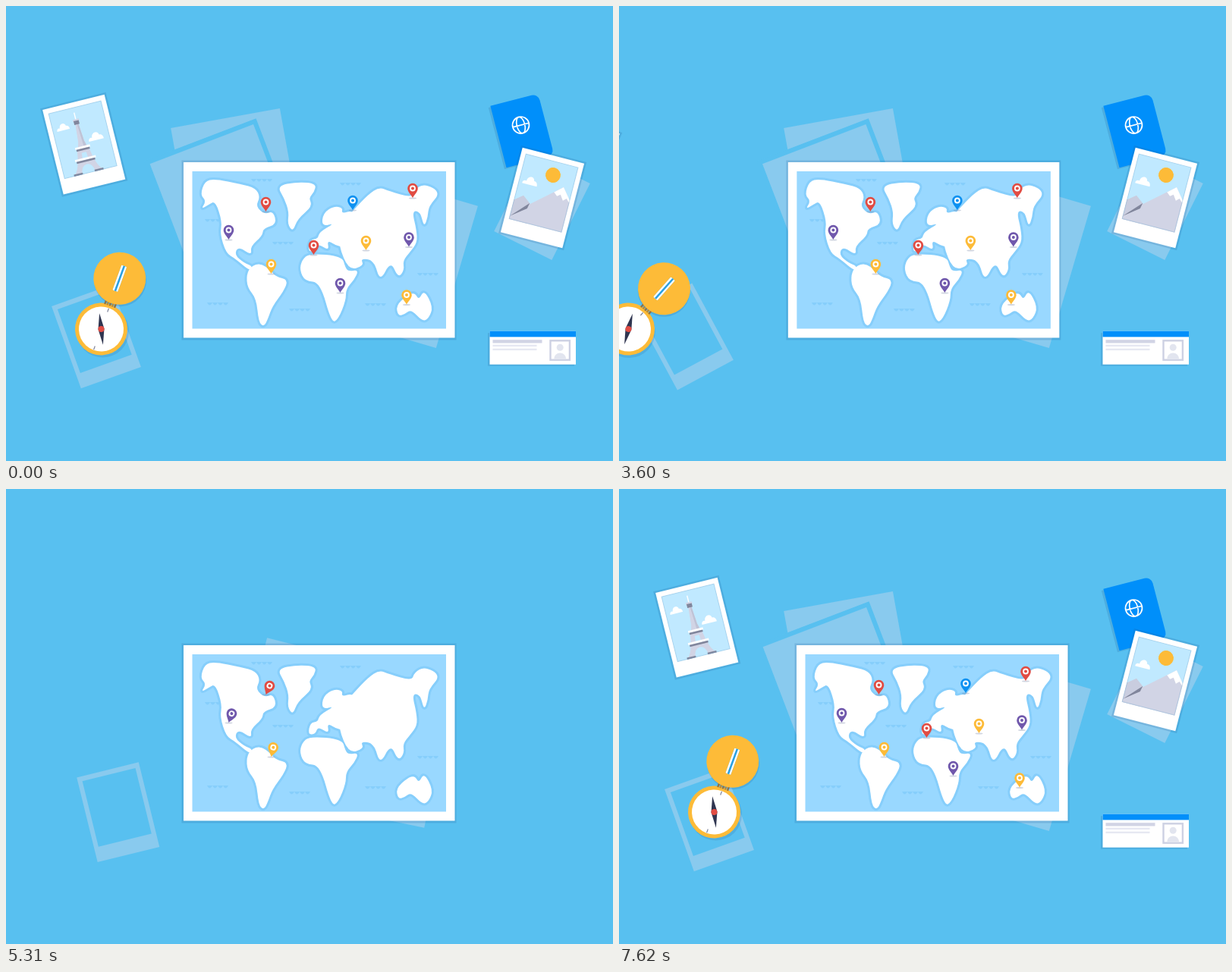
An HTML page with a canvas for the animation above (7.65 s loop, 800 by 600 pixels).

```html
<!DOCTYPE html>
<html lang="en">
<head>
<meta charset="utf-8">
<title>Travel desk</title>
<style>
  html, body { margin: 0; width: 100%; height: 100%; overflow: hidden; background: #58c0f0; }
  canvas { display: block; width: 800px; height: 600px; }
</style>
</head>
<body>
<canvas id="stage" width="800" height="600"></canvas>
<script>
const g = document.getElementById('stage').getContext('2d');
const LOOP = 7650, SWAP = 4580, PULL = 1.82e-6;
const BG = '#58c0f0', PALE = '#89caee', SKY = '#c0e9ff', BLUE = '#008ffa', GOLD = '#fdbb38';
const RED = '#e14c43', PURPLE = '#7058ac', STONE = '#d1d4e5', DARK = '#81869c', SHADE = 'rgba(35,95,155,.2)';

const clamp = v => Math.max(0, Math.min(1, v));
const span = (t, start, len) => clamp((t - start) / len);
const cubic = u => 1 - (1 - u) ** 3;
const back = u => 1 + 2.7 * (u - 1) ** 3 + 1.7 * (u - 1) ** 2;
const swing = u => u >= 1 ? 0 : 2 ** (-10 * u) * Math.cos(u * 2 * Math.PI / .3);

function at(x, y, deg, draw, sx = 1, sy = sx) {
  g.save();
  g.translate(x, y);
  g.rotate(deg * Math.PI / 180);
  g.scale(sx, sy);
  draw();
  g.restore();
}
function box(x, y, w, h, color) {
  g.fillStyle = color;
  g.fillRect(x, y, w, h);
}
function disc(x, y, r, color) {
  g.fillStyle = color;
  g.beginPath();
  g.arc(x, y, r, 0, 7);
  g.fill();
}
function poly(points, color) {
  g.fillStyle = color;
  g.beginPath();
  for (let i = 0; i < points.length; i += 2) g.lineTo(points[i], points[i + 1]);
  g.closePath();
  g.fill();
}
function smooth(...p) {
  const n = p.length / 2, path = new Path2D();
  const mid = i => [0, 1].map(k => (p[i % n * 2 + k] + p[(i + 1) % n * 2 + k]) / 2);
  path.moveTo(...mid(0));
  for (let i = 1; i <= n; i++) path.quadraticCurveTo(p[i % n * 2], p[i % n * 2 + 1], ...mid(i));
  path.closePath();
  return path;
}
function cloud(x, y, w) {
  at(x, y, 0, () => {
    g.fillStyle = '#fff';
    g.beginPath();
    g.moveTo(-10, 5);
    g.bezierCurveTo(-10, 1, -7, 0, -5, 1);
    g.bezierCurveTo(-5, -6, 4, -8, 5, -1);
    g.bezierCurveTo(8, -1, 10, 1, 10, 5);
    g.fill();
  }, w / 20);
}

// ---- world map ----
const north = smooth(256,249, 262,231, 275,228, 310,235, 329,240, 335,252, 329,264, 341,275, 352,270, 357,288,
  339,293, 338,303, 322,317, 324,329, 306,317, 301,328, 314,339, 325,343, 322,350, 302,333, 290,326, 282,300,
  285,285, 276,257, 267,262, 257,268, 264,257);
const south = smooth(317,354, 323,343, 336,339, 349,349, 356,357, 372,361, 366,376, 351,396, 345,413, 340,423,
  333,417, 330,386, 318,371);
const island = smooth(357,237, 384,232, 409,234, 406,246, 399,253, 404,264, 384,281, 378,298, 371,287, 373,272, 367,254);
const europe = smooth(398,324, 401,308, 411,307, 413,298, 434,286, 416,291, 418,273, 432,264, 444,266, 442,274,
  458,269, 475,290, 465,318, 438,318, 423,308, 426,323, 411,313, 408,323);
const asia = smooth(440,290, 458,269, 478,248, 492,239, 505,244, 535,253, 538,242, 552,234, 573,246, 557,264,
  556,278, 551,292, 546,271, 535,270, 541,295, 542,312, 532,325, 523,336, 525,348, 517,359, 507,336, 493,364,
  485,335, 467,333, 472,342, 452,349, 438,315);
const africa = smooth(390,335, 400,326, 443,330, 447,344, 451,350, 465,348, 459,361, 448,373, 448,388, 438,413,
  429,418, 414,364, 394,363, 387,348);
const outback = smooth(514,395, 529,381, 539,378, 544,388, 551,374, 563,397, 557,412, 549,416, 534,400, 526,406, 517,409);
const lands = [north, south, island, europe, asia, africa, outback];

const waves = [[323,228], [440,233], [262,281], [351,311], [542,352], [265,391], [373,399], [473,392]];
const pins = [
  [342.5, 258.5, RED], [293.5, 295.5, PURPLE], [349.5, 340.5, GOLD], [405.5, 315.5, RED], [440.5, 365.5, PURPLE],
  [457, 256.5, '#0d91f1'], [474.5, 309.5, GOLD], [528, 381, GOLD], [531, 305, PURPLE], [536, 240.5, RED]
];

function drawPin([x, y, color], t) {
  const lag = (536 - x) * 1.8, first = 1640 - lag, second = 5560 - lag;
  if (t >= SWAP && t < second) return;
  const age = t >= second ? t - second : t >= first ? t - first : 1e4;
  at(x, y + 13, 0, () => {
    g.fillStyle = 'rgba(120,135,165,.35)';
    g.beginPath();
    g.ellipse(0, 0, 5, 1, 0, 0, 7);
    g.fill();
  });
  at(x, y + 12.5, -95 * swing(clamp(age / 1000)), () => {
    g.fillStyle = color;
    g.beginPath();
    g.moveTo(0, 0);
    g.bezierCurveTo(-2, -4, -6.8, -8, -6.8, -12.5);
    g.arc(0, -12.5, 6.8, Math.PI, 0);
    g.bezierCurveTo(6.8, -8, 2, -4, 0, 0);
    g.fill();
    disc(0, -12.5, 3.9, '#fff');
    disc(0, -12.5, 2, color);
  }, Math.min(1, .35 + age / 45));
}

function drawMap(t) {
  let dx = 0, open = 1;
  if (t < SWAP) dx = -PULL * Math.max(0, t - 3418) ** 3;
  else {
    dx = 803 * (1 - span(t, SWAP, 300)) ** 3;
    open = cubic(span(t, 4800, 420));
  }
  if (dx < -620) return;
  const sx = (30 + 327 * open) / 357;
  at(412.5 + dx, 0, 0, () => {
    g.translate(-412.5, 0);
    box(234 - 2.5 / sx, 203.5, 357 + 5 / sx, 237, SHADE);
    box(234, 206, 357.5, 231.5, '#fff');
    box(245.5, 218, 334.5, 207.5, '#99d8ff');
    g.fillStyle = '#86cefb';
    for (const [x, y] of waves) {
      g.beginPath();
      g.moveTo(x, y);
      for (let i = 0; i < 4; i++) g.quadraticCurveTo(x + i * 7 + 3.5, y + 7, x + i * 7 + 7, y);
      g.fill();
    }
    g.lineJoin = 'round';
    g.lineWidth = 6;
    g.strokeStyle = '#86cefb';
    lands.forEach(p => g.stroke(p));
    g.fillStyle = '#fff';
    lands.forEach(p => g.fill(p));
    pins.forEach(p => drawPin(p, t));
    if (open < 1) {
      g.globalAlpha = 1 - open;
      box(234, 206, 357.5, 231.5, '#eaeaea');
      for (let i = 1; i < 4; i += 2) box(234 + i * 89.4, 206, 89.4, 231.5, `rgba(0,0,0,${.12 * open})`);
    }
  }, sx, 1);
}

// ---- photos ----
function photo(scene) {
  box(-44.5, -60, 89, 120, SHADE);
  box(-42, -57.5, 84, 115, '#fff');
  g.save();
  g.beginPath();
  g.rect(-36, -51, 72, 89);
  g.clip();
  box(-36, -51, 72, 89, SKY);
  scene();
  g.restore();
  g.strokeStyle = 'rgba(120,170,205,.35)';
  g.lineWidth = 1;
  g.strokeRect(-35.5, -50.5, 71, 88);
}

function tower(t) {
  const r = t < SWAP ? 0 : (1 - span(t, 5600, 900)) ** 3;
  cloud(-21.5 + 35 * r, -29, 17);
  cloud(17.5 + 32 * r, -7, 20);
  at(-2.5 + 80 * r, 0, 0, () => {
    box(-.7, -44, 1.4, 12, '#fff');
    poly([-2, -30, 2, -30, 4, -5, 7, 6, -7, 6, -4, -5], STONE);
    poly([0, -30, 2, -30, 4, -5, 7, 6, 2, 6], '#bfc3d6');
    poly([-8, 6, 8, 6, 10.5, 20, -10.5, 20], STONE);
    poly([-3, 10, 3, 10, 4, 20, -4, 20], SKY);
    g.fillStyle = STONE;
    for (const side of [-1, 1]) {
      g.beginPath();
      g.moveTo(0, 20);
      g.lineTo(side * 11, 20);
      g.quadraticCurveTo(side * 13, 31, side * 19, 37);
      g.lineTo(side * 9, 37);
      g.quadraticCurveTo(side * 7, 26, 0, 26);
      g.fill();
      box(side * 14 - 6, 35.5, 12, 3, DARK);
      g.fillStyle = STONE;
    }
    box(-4, -35, 8, 3, STONE);
    box(-3.5, -33, 7, 5, DARK);
    box(-10, 1.5, 20, 3, '#fff');
    box(-9, 4.5, 18, 2.5, DARK);
    box(-14, 17, 28, 3, '#fff');
    box(-12.5, 20, 25, 2.5, DARK);
  });
}

function peaks(t) {
  const late = t >= SWAP;
  const low = late ? 60 * (1 - back(span(t, 6150, 700))) : 0;
  const drift = late ? 50 * (1 - span(t, 6400, 700)) ** 3 : 0;
  if (!late || t >= 6950) {
    const start = late ? 6950 : 1625;
    const fall = t < start ? 0 : 1 - back(span(t, start, 600));
    disc(6 - 4 * fall, -32.5 + 45 * fall, 10, GOLD);
  }
  cloud(-21 + drift, -17.5, 20);
  at(0, low, 0, () => {
    poly([-36, 12, -25, 3, -12, 13, -10, 60, -36, 60], '#c9cddf');
    poly([-36, 33, -14.5, 12.5, 8, -7, 23.6, -20.6, 37, -4, 37, 90, -36, 90], STONE);
    poly([-36, 34, -14.5, 11, -16, 18.5], DARK);
    poly([13, -11, 23.6, -20.6, 37, -4, 37, -1, 31, -7, 27, -3, 22, -10, 18, -7], '#fff');
  });
}

// ---- compass ----
function slot() {
  g.roundRect(-3.6, 18, 7.2, 35, 1);
}
function compass(t) {
  const late = t >= SWAP;
  const u = late ? span(t, 5600, 450) : 1;
  const lift = 1.35 * (1 - u) ** 2;
  const flip = late ? cubic(span(t, 6020, 480)) : 1;
  const turn = late ? 16 * (1 - back(span(t, 6020, 600))) : 0;
  const c = Math.cos(Math.PI * flip);
  const wobble = -28.2 + 1.7 * Math.cos(4 * Math.PI * t / LOOP);
  const spin = t < 1750 ? 0 : -70 * (late ? swing(span(t, 6100, 1500)) : swing(span(t, 1750, 1200)));
  g.globalAlpha = late ? clamp(u * 4) : 1;
  at(27 * lift, -15 * lift, turn, () => {
    at(0, 0, -20 - turn, () => disc(2 + 85 * lift, 3 + 100 * lift, 34.5, 'rgba(35,95,155,.18)'));
    if (c < 0) at(0, -35.5, 0, () => disc(1.5, 33.5, 34.5, SHADE), 1, c);
    disc(0, 0, 34.5, GOLD);
    disc(0, 0, 29.5, '#fff');
    box(-.6, -29, 1.2, 5, DARK);
    box(-.6, 24, 1.2, 5, DARK);
    at(0, 0, wobble + spin, () => {
      poly([0, -21, 4, 0, 0, 21, -4, 0], '#2f3550');
      disc(0, 0, 4, RED);
    });
    for (let i = -2; i <= 2; i++) box(i * 3.4 - 1.2, -38, 2.4, 5.5, i % 2 ? '#b58a3c' : '#8c7448');
    at(0, -35.5, 0, () => {
      g.fillStyle = GOLD;
      g.beginPath();
      g.arc(0, 35.5, 34.5, 0, 7);
      g.closePath();
      slot();
      g.fill('evenodd');
      if (c < 0) {
        g.fillStyle = '#fff';
        g.beginPath();
        slot();
        g.fill();
        box(-1.2, 18, 2.6, 35, '#2aa1e4');
      }
    }, 1, Math.abs(c) < .02 ? .02 : c);
  }, 1 + lift);
  g.globalAlpha = 1;
}

// ---- papers ----
const sheet = (w, h) => () => box(-w / 2, -h / 2, w, h, PALE);
function edged() {
  box(-79, -99, 158, 198, BG);
  box(-73, -93, 146, 186, PALE);
}
function hollow() {
  g.fillStyle = PALE;
  g.beginPath();
  g.rect(-42, -57.5, 84, 115);
  g.rect(-36, -51, 72, 89);
  g.fill('evenodd');
}
function passport() {
  const cover = color => {
    g.fillStyle = color;
    g.beginPath();
    g.roundRect(-32.5, -42, 65, 84, [0, 9, 9, 0]);
    g.fill();
  };
  at(-3, 1.5, 0, () => cover(SHADE));
  cover(BLUE);
  at(0, -7.5, 0, () => {
    g.strokeStyle = '#fff';
    g.lineWidth = 1.7;
    g.beginPath();
    g.arc(0, 0, 11, 0, 7);
    g.moveTo(5.3, 0);
    g.ellipse(0, 0, 5.3, 11, 0, 0, 7);
    g.moveTo(-11, 0);
    g.lineTo(11, 0);
    g.stroke();
  });
}
function ticket(t) {
  const q = t < SWAP ? 1 : cubic(span(t, 6150, 500));
  box(-59.5, -19.5, 114, 43.5, SHADE);
  box(-57, -22, 113.5, 44, '#fff');
  box(-57, -22, 113.5, 7.7, BLUE);
  box(-53, -10.5, 65 * q, 4.3, STONE);
  box(-53, -4, 58 * q, 2.4, '#e6e8f2');
  box(-53, 1, 58 * q, 2.4, '#e6e8f2');
  if (q > 0) at(35.7, 3.3, 0, () => {
    g.strokeStyle = '#cdd1e3';
    g.lineWidth = 2.4;
    g.strokeRect(-12.7, -12.7, 25.4, 25.4);
    disc(0, -3.8, 4.5, '#e2e5ef');
    g.beginPath();
    g.arc(0, 11.5, 8, Math.PI, 0);
    g.fill();
  }, q);
}

// Leaves at `out`, turning `roll` degrees per px; returns at `start` from offset dx, dy.
function item(t, draw, x, y, deg, out, roll, start, dx, dy, spin, len = 800) {
  if (t < SWAP) {
    const d = -PULL * Math.max(0, t - out) ** 3;
    if (x + d > -160) at(x + d, y, deg + roll * d, () => draw(t));
  } else if (t >= start) {
    const r = (1 - span(t, start, len)) ** 3;
    at(x + dx * r, y + dy * r, deg + spin * r, () => draw(t));
  }
}

const began = performance.now();
function frame() {
  const t = (performance.now() - began) % LOOP;
  box(0, 0, 800, 600, BG);
  item(t, sheet(146, 186), 305.5, 239.5, -10.2, 3596, .1255, 5250, 107, 80, 30, 900);
  item(t, edged, 291, 269, -20.9, 3535, .153, 5550, 108, 40, 24);
  item(t, sheet(155, 195), 520, 335.5, 16.4, 3655, -.134, 5000, -108, 0, -20);
  item(t, sheet(85, 113), 706.5, 265.5, 26.5, 3832, -.1, 5350, -294, 20, -45);
  item(t, hollow, 119, 436, -19.7, 3340, .266, 4880, 293, -100, 60);
  item(t, compass, 125.5, 426, 20, 3205, -.19, 5600, 0, 0, 0);
  item(t, () => photo(() => tower(t)), 102.7, 182.7, -13.9, 3146, .3, 5440, 310, 100, 60, 460);
  item(t, passport, 680.4, 164.3, -14.6, 3807, -.23, 5394, -257, 100, -246);
  item(t, () => photo(() => peaks(t)), 707, 253, 14.5, 3688, -.146, 5470, -295, 77, -126);
  item(t, ticket, 694.5, 450.7, 0, 3744, 0, 5593, -282, -75, 59);
  drawMap(t);
  requestAnimationFrame(frame);
}
frame();
</script>
</body>
</html>
```
